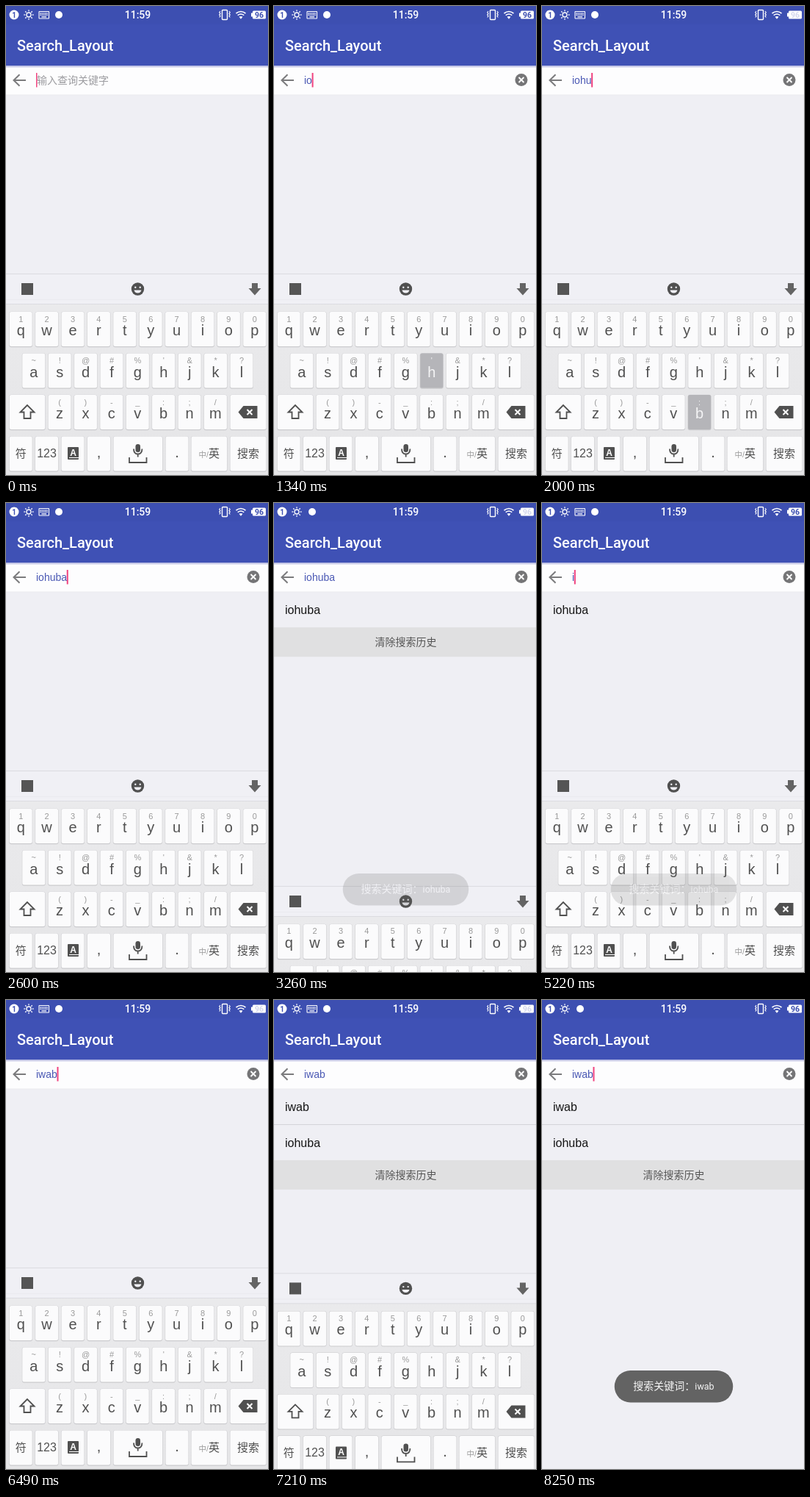
These frames come from a looping animation (357x638 px, 8430 ms). An HTML page:

```html
<!DOCTYPE html>
<html lang="zh">
<head>
<meta charset="utf-8">
<title>Search_Layout</title>
<style>
html, body { margin: 0; width: 100%; height: 100%; overflow: hidden; background: #efeff4; }
svg { display: block; width: 357px; height: 638px; }
text { font-family: "Liberation Sans", "Noto Sans CJK SC", "Noto Sans CJK", sans-serif; white-space: pre; }
.ui { font-family: Roboto, "Noto Sans CJK SC", "Noto Sans CJK", sans-serif; }
.mid { text-anchor: middle; }
</style>
</head>
<body>
<svg id="stage" viewBox="0 0 357 638">
  <defs>
    <linearGradient id="shade" x2="0" y2="1"><stop stop-color="#a9addb"/><stop offset="1" stop-color="#f3f3fa"/></linearGradient>
    <linearGradient id="board" x2="0" y2="1"><stop stop-color="#ebebed"/><stop offset="1" stop-color="#e5e5e7"/></linearGradient>
  </defs>
  <rect width="357" height="638" fill="#efeff4"/>
  <g id="list"></g>
  <rect y="84" width="357" height="37" fill="#fdfdfe"/>
  <rect y="120.5" width="357" height="1" fill="#ebebef"/>
  <rect y="24" width="357" height="57.5" fill="#3f51b5"/>
  <rect width="357" height="24.5" fill="#3d4fb1"/>
  <rect y="81" width="357" height="3" fill="url(#shade)"/>
  <text class="ui" x="15" y="61" font-size="20" font-weight="500" fill="#fff">Search_Layout</text>

  <g id="status" fill="#fff">
    <circle cx="11" cy="12" r="6.5"/>
    <text class="ui mid" x="11" y="15.7" font-size="10" font-weight="700" fill="#3d4fb1">1</text>
    <g id="sun" fill="none" stroke="#fff" stroke-width="1.3"><circle cx="31" cy="12" r="3"/></g>
    <g id="boardIcon" fill="none" stroke="#fff">
      <rect x="45" y="7.5" width="13.5" height="9.5" rx=".5" stroke-width="1.1"/>
      <path d="M46.5 10h11M46.5 12.3h11" stroke-width="1.4" stroke-dasharray="1.4 .8"/>
      <path d="M48.5 14.8h6.5" stroke-width="1.3"/>
    </g>
    <circle id="dot" cy="12" r="5"/>
    <text class="ui mid" x="179.5" y="17" font-size="14" font-weight="500">11:59</text>
    <g fill="none" stroke="#fff" stroke-width="1.4">
      <rect x="294.5" y="5.5" width="7" height="13" rx="1"/>
      <path d="M292 7l-1.3 1.7 1.3 1.7-1.3 1.7 1.3 1.7-1.3 1.7M304 7l1.3 1.7-1.3 1.7 1.3 1.7-1.3 1.7 1.3 1.7" stroke-width="1.1"/>
      <path d="M313.5 10q6.5-5 13 0M315.7 12.7q4.3-3.3 8.6 0" stroke-width="1.6"/>
    </g>
    <path d="M317.5 14.8q2.5-1.7 5 0l-2.5 3z"/>
    <rect x="336" y="6.5" width="18" height="11" rx="1.5"/>
    <rect x="334" y="9.5" width="2" height="5"/>
    <text id="charge" class="ui mid" x="345" y="15.7" font-size="10.5" font-weight="700" fill="#3d4fb1">96</text>
  </g>

  <path d="M27 101H11M18.5 93.2L10.5 101l8 7.8" fill="none" stroke="#7b7b7d" stroke-width="2"/>
  <text id="hint" x="42" y="106" font-size="14" fill="#9c9ca0">输入查询关键字</text>
  <text id="typed" x="41" y="106" font-size="14" fill="#4a58b4"></text>
  <rect id="caret" y="91" width="2" height="19.5" fill="#f0427f"/>
  <g id="clearIcon">
    <circle cx="337" cy="100.5" r="8.5" fill="#757577"/>
    <path d="M333.5 97l7 7m0-7l-7 7" stroke="#fff" stroke-width="1.9"/>
  </g>

  <g id="keyboard">
    <rect y="364" width="357" height="274" fill="url(#board)"/>
    <rect y="364" width="357" height="41" fill="#f0f0f5"/>
    <path d="M0 364.5h357M0 405.5h357" stroke="#dcdce1"/>
    <path d="M0 399.5h357" stroke="#eaeaef"/>
    <rect x="21" y="377" width="16" height="16" fill="#555"/>
    <circle cx="179.5" cy="385" r="8.7" fill="#505050"/>
    <g fill="#f0f0f5"><circle cx="176.3" cy="382.7" r="1.2"/><circle cx="182.7" cy="382.7" r="1.2"/>
      <path d="M174.5 386.5h10q-1 4-5 4t-5-4z"/></g>
    <path d="M335 377h8v7h4.5l-8.5 9.5-8.5-9.5h4.5z" fill="#646464"/>
    <g id="keys"></g>
    <path d="M29 543l-9.5 9.5h5v8.5h9v-8.5h5z" fill="none" stroke="#505050" stroke-width="1.8"/>
    <path d="M316.5 552.5l7-8.5h19v17h-19z" fill="#505050"/>
    <path d="M328.5 549l7 7m0-7l-7 7" stroke="#fff" stroke-width="2"/>
    <rect x="84" y="600" width="15" height="17" rx="1" fill="#505050"/>
    <text class="mid" x="91.5" y="612" font-size="12" font-weight="700" fill="#fff">A</text>
    <path d="M86 614.5h13" stroke="#fff"/>
    <rect x="176.5" y="596" width="6.5" height="11" rx="3.2" fill="#505050"/>
    <path d="M174 602.5q0 7 5.7 7t5.7-7M179.7 609.5v4M168 614v7h23.5v-7" fill="none" stroke="#505050" stroke-width="1.8"/>
  </g>

  <g id="toast">
    <rect id="pill" y="504" height="43.5" rx="21.7" fill="#636363"/>
    <text class="ui mid" x="179.5" y="529.5" font-size="14" fill="#f4f4f4">搜索关键词：<tspan id="term" font-size="12.5"></tspan></text>
  </g>
</svg>
<script>
const LOOP = 8430, FIRST = "iohuba", SECOND = "iwab";
const INK = "#505050";
const $ = id => document.getElementById(id);

function add(parent, tag, attrs, label = "") {
  const node = document.createElementNS("http://www.w3.org/2000/svg", tag);
  for (const name in attrs) node.setAttribute(name, attrs[name]);
  node.textContent = label;
  return parent.appendChild(node);
}

for (let i = 0; i < 8; i++) {
  add($("sun"), "path", { d: "M31 7.3v-2", transform: `rotate(${i * 45} 31 12)` });
}

const keys = {};
function addKey(name, x, y, width, label, size = 20, mark = "") {
  const g = add($("keys"), "g", {});
  add(g, "rect", { x: x - .5, y: y - .3, width: width + 1, height: 48.5, rx: 3, fill: "#cbcbce" });
  const face = add(g, "rect", { x, y, width, height: 47, rx: 2.5 });
  const mid = x + width / 2;
  const small = add(g, "text", { class: "mid", x: mid, y: y + 13.5, "font-size": 11 }, mark);
  const big = add(g, "text", { class: "mid", x: mid, y: y + (mark ? 32 : 28.5), "font-size": size }, label);
  keys[name] = { face, small, big };
}

function addRow(letters, marks, x, y) {
  [...letters].forEach((c, i) => addKey(c, x + i * 35.4, y, 31, c, 20, marks[i]));
}
addRow("qwertyuiop", "1234567890", 4.7, 416);
addRow("asdfghjkl", "~!@#%'&*?", 22.3, 472.5);
addRow("zxcvbnm", "()-_:;/", 57.5, 529);
const BOTTOM = 585.5;
addKey("shift", 4.7, 529, 48.5, "");
addKey("back", 305.5, 529, 49, "");
addKey("sym", 4.7, BOTTOM, 31, "符", 15);
addKey("num", 40, BOTTOM, 31, "123", 16);
addKey("dict", 75.5, BOTTOM, 31, "");
addKey("comma", 111, BOTTOM, 31, ",");
addKey("space", 146.5, BOTTOM, 66.5, "");
addKey("stop", 217.5, BOTTOM, 31, ".");
addKey("lang", 252.5, BOTTOM, 48.5, "", 15);
addKey("go", 305.5, BOTTOM, 49, "搜索", 15);
add(keys.lang.big, "tspan", { "font-size": 10.5, fill: "#999" }, "中/");
add(keys.lang.big, "tspan", {}, "英");

// time, typed text, history rows, clear button
const states = [
  [0, "", [], false],
  [790, FIRST.slice(0, 1), [], false],
  [1090, FIRST.slice(0, 2), [], false],
  [1460, FIRST.slice(0, 3), [], false],
  [1820, FIRST.slice(0, 4), [], false],
  [2120, FIRST.slice(0, 5), [], false],
  [2420, FIRST, [], false],
  [3100, FIRST, [FIRST], true],
  [4030, "", [FIRST], true],
  [5160, SECOND.slice(0, 1), [FIRST], false],
  [5510, SECOND.slice(0, 2), [], false],
  [5940, SECOND.slice(0, 3), [], false],
  [6310, SECOND, [], false],
  [7200, SECOND, [SECOND, FIRST], true]
];
const presses = [
  [670, 790, "i"], [970, 1090, "o"], [1340, 1460, "h"], [1700, 1820, "u"],
  [2000, 2120, "b"], [2300, 2420, "a"], [2900, 3020, "go"],
  [5040, 5160, "i"], [5400, 5510, "w"], [5820, 5940, "a"], [6190, 6310, "b"], [6970, 7090, "go"]
];
const caretOff = [[150, 730], [2900, 3400], [3790, 4030], [4560, 5060], [6970, 7300], [7690, 8250]];
const chargePale = [[120, 1300], [1500, 2480], [2680, 4220], [4320, 5060], [5250, 6560], [6700, 7600]];

const within = (t, spans) => spans.some(([a, b]) => t >= a && t < b);
const ramp = (t, a, b) => Math.min(1, Math.max(0, (t - a) / (b - a)));
const show = (node, on) => node.setAttribute("visibility", on ? "visible" : "hidden");

let current, pressed;

function showState(state) {
  const [, typed, rows, clear] = current = state;
  $("typed").textContent = typed;
  show($("hint"), !typed);
  show($("clearIcon"), typed);
  const caret = $("caret");
  caret.setAttribute("x", 41 + (typed ? $("typed").getComputedTextLength() - .3 : 0));
  caret.setAttribute("width", typed ? 2 : 1.5);
  const list = $("list");
  list.replaceChildren();
  rows.forEach((name, i) => {
    if (i) add(list, "rect", { y: 120.5 + 48.5 * i, width: 357, height: 1, fill: "#d4d4d8" });
    add(list, "text", { x: 15, y: 151 + 49 * i, "font-size": 16, fill: "#161616" }, name);
  });
  if (clear) {
    const y = 120.5 + 48.7 * rows.length;
    add(list, "rect", { y, width: 357, height: 40, fill: "#e0e0e1" });
    add(list, "text", { class: "mid", x: 179.5, y: y + 24.7, "font-size": 14, fill: "#555" }, "清除搜索历史");
  }
}

function pressKey(name) {
  pressed = name;
  for (const id in keys) {
    const { face, small, big } = keys[id], on = id === name;
    face.setAttribute("fill", on ? "#b5b5b9" : "#fbfbfc");
    small.setAttribute("fill", on ? "#f4f4f5" : "#999");
    big.setAttribute("fill", on ? "#f4f4f5" : INK);
  }
}

function showToast(t) {
  const late = t > 6000;
  const width = late ? 161.5 : 171.5;
  $("pill").setAttribute("width", width);
  $("pill").setAttribute("x", 179.5 - width / 2);
  $("term").textContent = late ? SECOND : FIRST;
  const alpha = late ? ramp(t, 7400, 7690) : ramp(t, 3200, 3500) * (1 - ramp(t, 4980, 5270));
  $("toast").setAttribute("opacity", alpha);
}

function render(t) {
  const state = states.findLast(s => s[0] <= t);
  if (state !== current) showState(state);
  const press = presses.find(([a, b]) => t >= a && t < b);
  const name = press ? press[2] : "";
  if (name !== pressed) pressKey(name);

  const away = t < 4100 ? ramp(t, 3080, 3320) ** 2
    : t < 6000 ? (1 - ramp(t, 4170, 4320)) ** 2
    : ramp(t, 7170, 7420) ** 2;
  $("keyboard").setAttribute("transform", `translate(0 ${away * 276})`);
  show($("keyboard"), away < 1);
  show($("boardIcon"), away < .5);
  $("dot").setAttribute("cx", away < .5 ? 72 : 52);

  show($("caret"), !within(t, caretOff));
  $("charge").setAttribute("opacity", within(t, chargePale) ? .22 : 1);
  showToast(t);
}

function tick() {
  render(performance.now() % LOOP);
  requestAnimationFrame(tick);
}
tick();
</script>
</body>
</html>
```
